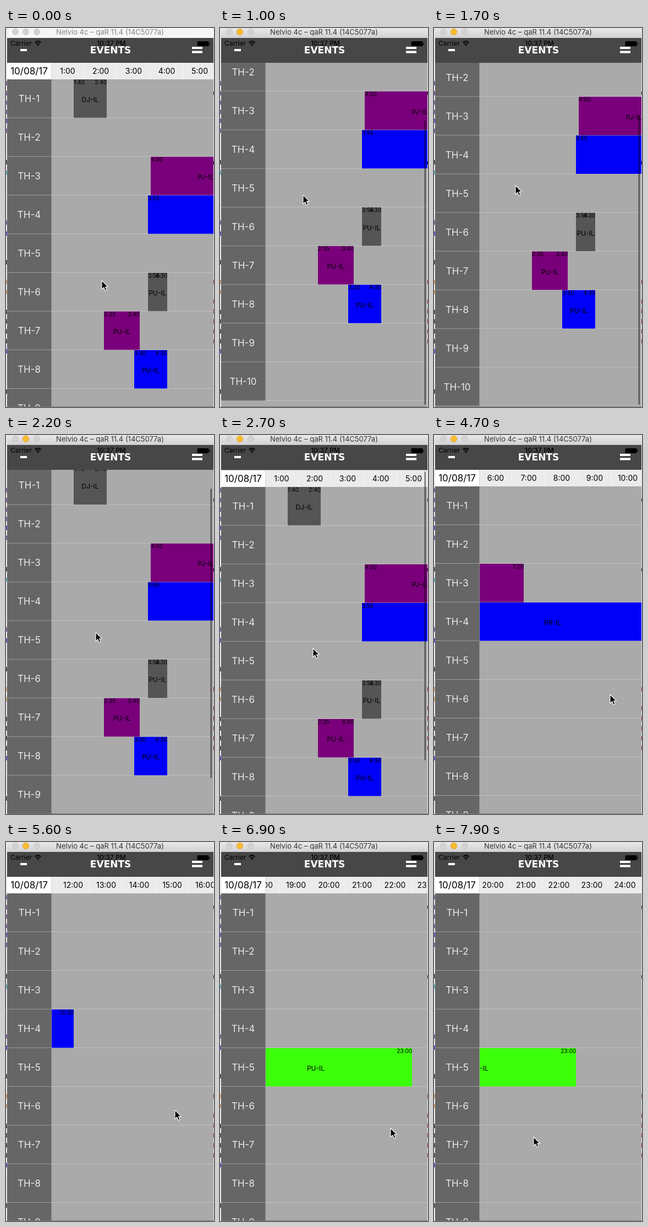
Write an HTML page that moves like this. It is 378 px wide and 686 px high and loops after 8000 ms.

```html
<!DOCTYPE html>
<html lang="en">
<head>
<meta charset="utf-8">
<title>Events schedule</title>
<style>
  html, body { margin: 0; width: 100%; height: 100%; overflow: hidden; background: #fff; }
  svg { display: block; width: 378px; height: 686px; }
  text { font-family: Inter, "Open Sans", sans-serif; }
  .mid { text-anchor: middle; }
  .end { text-anchor: end; }
</style>
</head>
<body>
<svg id="stage" viewBox="0 0 378 686" xmlns="http://www.w3.org/2000/svg">
  <defs>
    <linearGradient id="bar" x2="0" y2="1">
      <stop offset="0" stop-color="#e9e7e9"/><stop offset="1" stop-color="#d2d0d2"/>
    </linearGradient>
    <clipPath id="body"><rect x="2" y="63" width="375" height="622"/></clipPath>
    <clipPath id="pane"><rect x="83" y="0" width="294" height="900"/></clipPath>
  </defs>
  <rect width="378" height="686" fill="#e9e7ec"/>
  <g id="edges"></g>

  <g clip-path="url(#body)">
    <rect x="2" y="63" width="375" height="622" fill="#aaa"/>
    <g id="scroll">
      <g id="lines"></g>
      <g clip-path="url(#pane)"><g id="track"></g></g>
      <rect x="2" y="93" width="80.5" height="700" fill="#666"/>
      <g id="rows"></g>
      <rect x="2" y="63" width="80.5" height="30" fill="#fff"/>
      <text class="mid" x="42" y="84" font-size="17">10/08/17</text>
    </g>
    <rect id="thumb" x="371.5" width="2.5" height="524" rx="1.25" fill="#000" fill-opacity=".5"/>
  </g>

  <rect x="2" y="17" width="375" height="46" fill="#474747"/>
  <text x="8" y="32" font-size="12">Carrier</text>
  <g fill="none" stroke="#000" stroke-width="1.7">
    <path d="M52.5 26.5Q58 21.5 63.500 26.500M54.500 29Q58 25.700 61.500 29"/>
  </g>
  <path d="M56 30.500Q58 28.800 60 30.500L58 32.800Z"/>
  <text class="mid" x="191.500" y="32" font-size="12" font-weight="500">10:37 PM</text>
  <rect x="347.500" y="24" width="21" height="9" rx="1.500"/>
  <rect x="369.300" y="27" width="1.500" height="3.500" rx=".7"/>
  <text class="mid" x="190" y="46" font-size="17" font-weight="700" fill="#fff"
    style="font-family:'DejaVu Sans',sans-serif">EVENTS</text>
  <g fill="#fff">
    <rect x="26" y="38" width="12" height="4"/>
    <rect x="338" y="34" width="19" height="4"/>
    <rect x="338" y="41.500" width="19" height="4"/>
  </g>

  <path id="titleBar" d="M2 18V4Q2 0 6 0H373Q377 0 377 4V18Z"/>
  <circle cx="17" cy="7" r="5.500" fill="#d3d1d3" stroke="#c3c1c3" stroke-width=".7"/>
  <circle id="light" cx="36" cy="7" r="5.700" stroke-width=".7"/>
  <circle cx="56" cy="7" r="5.500" fill="#d3d1d3" stroke="#c3c1c3" stroke-width=".7"/>
  <text id="title" class="mid" x="189" y="12" font-size="13">Nelvio 4c – qaR 11.4 (14C5077a)</text>
  <rect x="2" y="685" width="375" height="1" fill="#777"/>

  <path id="cursor" d="M0 0V16L3.700 12.600L6.300 18.300L9 17.100L6.500 11.500H11.400Z"
    fill="#000" stroke="#fff" stroke-width="1.100" stroke-linejoin="round"/>
</svg>
<script>
const LOOP = 8000, STEP = 100, ROW = 70, TOP = 93, LEFT = 82;
const $ = id => document.getElementById(id);

function add(parent, tag, attrs, text) {
  const el = document.createElementNS("http://www.w3.org/2000/svg", tag);
  for (const k in attrs) el.setAttribute(k, attrs[k]);
  if (text) el.textContent = text;
  parent.append(el);
  return el;
}

// One pixel per minute, the axis starts at 1:00
const toX = clock => {
  const [h, m] = clock.split(":").map(Number);
  return LEFT + (h - 1) * 60 + m;
};

const GRAY = "#555", PURPLE = "#7a007b", BLUE = "#0000f8", GREEN = "#3cff0a";
const events = [
  [1, "1:40", "2:40", "DJ-IL", GRAY],
  [3, "4:00", "7:20", "PJ-IL", PURPLE],
  [4, "3:55", "12:30", "PR-IL", BLUE],
  [5, "17:10", "23:00", "PU-IL", GREEN],
  [6, "3:55", "4:30", "PU-IL", GRAY],
  [7, "2:35", "3:40", "PU-IL", PURPLE],
  [8, "3:30", "4:30", "PU-IL", BLUE]
];

function build() {
  const track = $("track");
  for (let h = 1; h <= 24; h++) {
    const x = toX(h + ":00");
    add(track, "rect", { x, y: 63, width: 60, height: 30, fill: "#ebebeb" });
    add(track, "rect", { x: x + 59.5, y: 63, width: 1.2, height: 30, fill: "#fff" });
    add(track, "text", { class: "mid", x: x + 30, y: 83, "font-size": 14 }, h + ":00");
  }
  for (const [row, from, to, name, fill] of events) {
    const y = TOP + (row - 1) * ROW, x = toX(from) + 1, end = toX(to) + 1;
    add(track, "rect", { x, y, width: end - x, height: 69.5, fill });
    add(track, "text", { x, y: y + 8.5, "font-size": 10 }, from);
    add(track, "text", { class: "end", x: end, y: y + 8.5, "font-size": 10 }, to);
    add(track, "text", { class: "mid", x: (x + end) / 2, y: y + 41, "font-size": 12 }, name);
  }
  for (let i = 1; i <= 10; i++) {
    const y = TOP + i * ROW;
    add($("lines"), "rect", { x: 82, y: y - 1, width: 295, height: 1, fill: "#c2c2c2" });
    add($("rows"), "rect", { x: 2, y: y - 1, width: 80.5, height: 1, fill: "#9c9c9c" });
    add($("rows"), "text", { class: "mid", x: 42, y: y - 29, "font-size": 17, fill: "#ebebeb" }, "TH-" + i);
  }
  // Slivers of the window behind
  const marks = {
    "#63358c": [100, 118, 135, 152, 186, 352],
    "#2a2ac0": [168, 372, 585],
    "#222": [243, 424, 514, 531, 549, 567, 658],
    "#3aa0b8": [262],
    "#c98a3a": [460, 478]
  };
  for (const fill in marks)
    for (const y of marks[fill]) add($("edges"), "rect", { x: 0, y: y - 4, width: 1.5, height: 8, fill });
  for (const y of [460, 495, 513, 531, 549, 567])
    add($("edges"), "rect", { x: 377, y: y - 4, width: 1, height: 8, fill: "#a03a40" });
  for (const y of [118, 244])
    add($("edges"), "rect", { x: 377, y: y - 3, width: 1, height: 6, fill: "#333" });
}

const ease = {
  in: p => p ** 1.5,
  out: p => 1 - (1 - p) ** 3,
  both: p => p * p * (3 - 2 * p)
};

// Keys are [time, value, easing towards it]
function at(keys, t) {
  let [t0, v0] = keys[0];
  for (const [t1, v1, kind = "both"] of keys) {
    if (t < t1) return t <= t0 ? v0 : v0 + (v1 - v0) * ease[kind]((t - t0) / (t1 - t0));
    [t0, v0] = [t1, v1];
  }
  return v0;
}

const scrollY = [
  [600, 0], [1100, 132], [1600, 108.5, "out"],
  [1800, 108.5], [2300, 8, "in"], [2450, -9, "out"], [2700, -1], [2900, 0]
];
const scrollX = [
  [3400, 0], [3900, 154, "in"], [4600, 300, "out"],
  [4700, 300], [5100, 475, "in"], [5600, 650, "out"],
  [5700, 650], [6100, 822, "in"], [6900, 1054, "out"],
  [7000, 1054], [7350, 1162], [7700, 1145, "out"]
];
const mouseX = [
  [300, 174], [1100, 150], [1500, 148], [1800, 148], [2300, 169, "in"],
  [2900, 169], [3300, 317], [3400, 317], [3900, 163, "in"],
  [4100, 155, "out"], [4600, 320], [4700, 320], [5100, 145, "in"],
  [5500, 307], [5700, 307], [6100, 135, "in"],
  [6250, 130], [6750, 310], [7000, 310], [7400, 181]
];
const mouseY = [
  [500, 457], [1100, 290], [1500, 285], [1800, 285], [2300, 386, "in"],
  [2900, 386], [3300, 425], [3900, 416], [4600, 470], [5100, 468],
  [5500, 485], [6100, 490], [6750, 518], [7000, 518], [7400, 534]
];
const thumbFade = [[500, 0], [700, 1], [2750, 1], [3050, 0]];

function draw(t) {
  const sy = at(scrollY, t);
  $("scroll").setAttribute("transform", `translate(0 ${-sy})`);
  $("track").setAttribute("transform", `translate(${-at(scrollX, t)} 0)`);

  const over = Math.max(0, sy - 108.5, -sy);
  const pos = Math.min(1, Math.max(0, sy / 108.5));
  $("thumb").setAttribute("height", 524 - over);
  $("thumb").setAttribute("y", 66 + pos * 92 + (sy > 108.5 ? over : 0));
  $("thumb").setAttribute("opacity", at(thumbFade, t));

  const active = t >= 600;
  $("titleBar").setAttribute("fill", active ? "url(#bar)" : "#f6f6f6");
  $("title").setAttribute("fill", active ? "#333" : "#858585");
  $("light").setAttribute("fill", active ? "#f9bb2f" : "#d3d1d3");
  $("light").setAttribute("stroke", active ? "#dda02a" : "#c3c1c3");
  $("cursor").setAttribute("transform", `translate(${at(mouseX, t)} ${at(mouseY, t)})`);
}

build();
const start = performance.now();
function tick() {
  const t = (performance.now() - start) % LOOP;
  draw(Math.floor(t / STEP) * STEP);
  requestAnimationFrame(tick);
}
tick();
</script>
</body>
</html>
```
